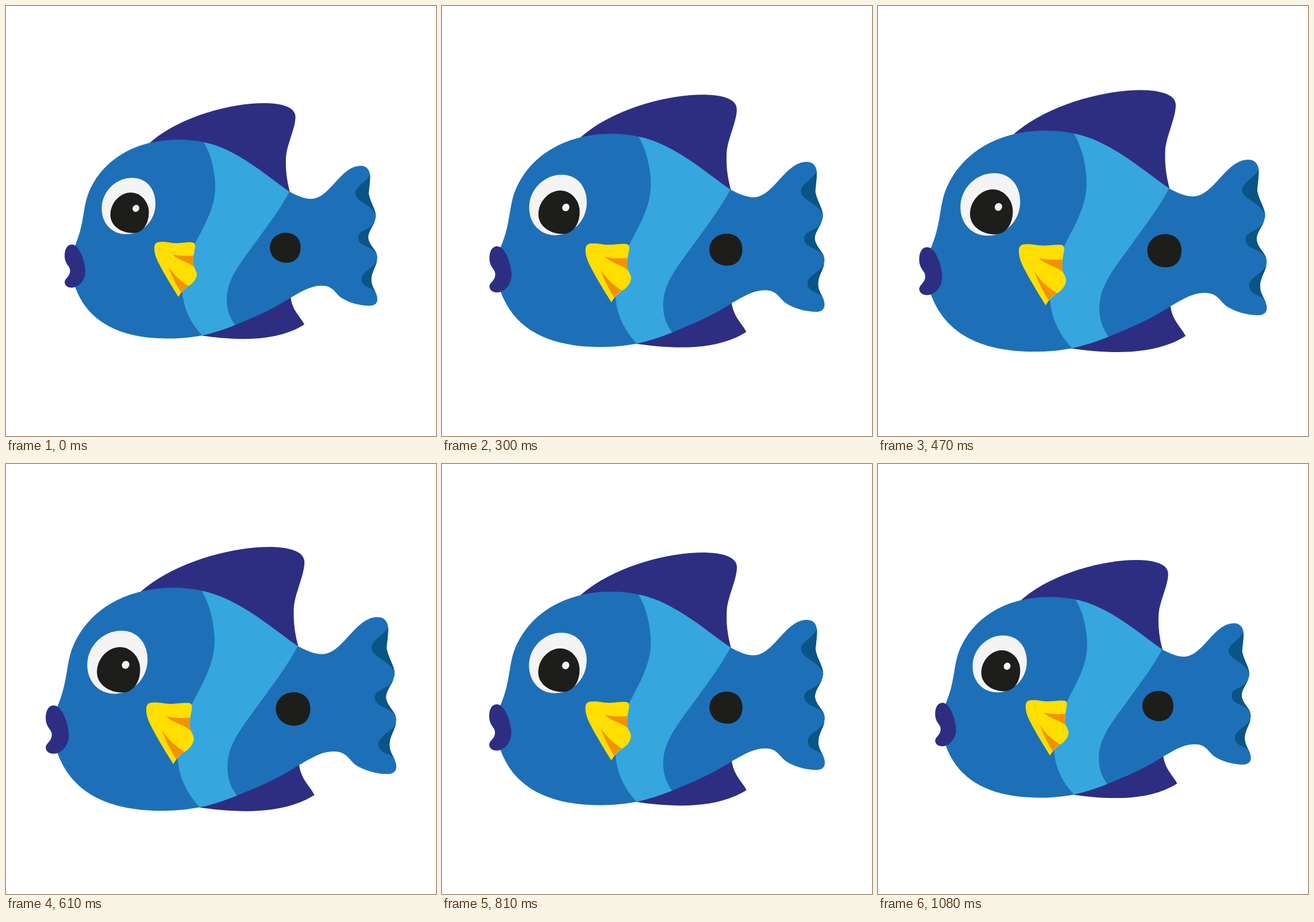
Recreate the animation shown at these times as an HTML page. Size 748x748 px, loop 1.11 s.

```html
<!DOCTYPE html>
<html lang="en">
<head>
<meta charset="utf-8">
<title>Pulsing fish</title>
<style>
  html, body { margin: 0; height: 100%; overflow: hidden; background: #fff; }
  svg { display: block; width: 100%; height: 100%; }
</style>
</head>
<body>
<svg viewBox="0 0 748 748">
  <g id="fish">
    <!-- back and belly fins -->
    <g fill="#2d2e82">
      <path d="M249 239C300 193 390 169 448 169C475 169 503.500 174 503.500 193C503.500 213 488 242 487 264C486 287 489 305 494 324L400 300Z"/>
      <path d="M338 573C400 582 470 585 519 554C512 540 498 530 495 506L398 545Z"/>
    </g>
    <!-- body and tail -->
    <path fill="#1d70b7" d="M120 417C136 380 133 356 142.500 328C164 271 221 232.500 300 232.500C315 232.500 330 234 344 237C400 248 450 293 493 323C505 329 517 335.500 531 335.500C563 335.500 582 278 617 278C628 278 633.500 286 633.500 297C633 312 631 320 631 327C634 342 643 353 643.500 366C642 380 630 391 630 403C632 417 645 424 646 437C645 452 635 463 635.500 477C636 489 646 498 646 510C646 518 640 521.500 632 521.500C612 521 595 515 584 508C572 500 570 486.400 549 486.400C529 486.400 512 498 495 507.500C460 530 430 542 398.500 555C378 563 360 569 341 573C321 577 300 578.500 285 578.500C203 579 143 553 120 488Z"/>
    <path fill="#36a6df" d="M344 237C400 248 450 293 493 323C478 352 455 382 437 407C408 447 384 475 384 510C384 530 390 543 398.500 555C378 563 360 569 341 573C322 552 310 530 307 500C305 470 316 440 329 413C343 385 364 352 364 315C364 290 357 258 344 237Z"/>
    <!-- tail folds -->
    <g fill="#0b5486">
      <path d="M633.300 294C625 307 607 315 607.500 326C608 340 636 345 643.400 364C642 352 634 342 631 327C631 320 633 312 633.300 294Z"/>
      <path d="M642.500 373C634 392 613 388 612.700 403C613 419 638 417 645.500 433C643 423 632 417 630 403C630 391 640 381 642.500 373Z"/>
      <path d="M645.700 442C640 457 619 461 618.300 475C619 489 634 489 641.500 496C638 490 636 486 635.500 477C635 463 644 454 645.700 442Z"/>
    </g>
    <!-- lips -->
    <path fill="#2d2e82" d="M114 415C128 414 138 446 138 461C138 478 126 490 114 490C106 490 102 485 102 480C103 473 111 471 111.500 461C112 452 102 450 102 434C102 424 106 415 114 415Z"/>
    <!-- eye and side spot -->
    <path fill="#f4f4f4" d="M166.500 352C166.500 322 192 299 219 299C246 299 260 320 260 344C260 374 236 397 209 397C184 397 166.500 378 166.500 352Z"/>
    <g fill="#1d1d1b">
      <path d="M181.500 363C181.500 342 199 324.500 217 324.500C235 324.500 248.500 341 248.500 359C248.500 380 237 395 221 395C201 395 181.500 383 181.500 363Z"/>
      <path d="M459 420C459 405 472 394.500 487 394.500C503 394.500 512.500 405 512.500 420C512.500 436 503 446.500 488 446.500C472 446.500 459 436 459 420Z"/>
    </g>
    <ellipse cx="226" cy="352" rx="5.700" ry="6.300" transform="rotate(30 226 352)" fill="#f4f4f4"/>
    <!-- side fin -->
    <path fill="#ffde00" d="M258 422C257.500 413 262 410.500 268 410.500C280 409.500 285 413 300 412.500C312 411.500 319 410.500 325 411.500C330 412.500 329.500 418 327.500 427C325 440 325 448 327.500 455C330 460 332 463 332 467C331 477 323 484 316 488C308 494 304 499 300 506C290 490 274 464 267 450C261 439 258 430 258 422Z"/>
    <g fill="#f39200">
      <path d="M289 432C302 435 315 435 326 434C325.500 441 325.500 447 327 454C317 445 301 443 289 432Z"/>
      <path d="M282.500 453C291 467 303 478 317.500 487C312 490 308 494 304.500 498C295 483 288 469 282.500 453Z"/>
    </g>
  </g>
</svg>
<script>
  const LOOP = 1110, STEPS = 33, GROWTH = 0.00797, TURN = 33.2;
  const fish = document.getElementById("fish");
  const start = performance.now();

  function draw(now) {
    const t = Math.max(0, now - start) % LOOP;
    // steps begin on 10 ms ticks
    const step = Math.floor((Math.floor(t / 10) + 0.5) * 10 * STEPS / LOOP);
    const scale = 1 + GROWTH * Math.min(step, TURN - step);
    fish.setAttribute("transform", `translate(374 374) scale(${scale}) translate(-374 -374)`);
    requestAnimationFrame(draw);
  }
  draw(start);
</script>
</body>
</html>
```
